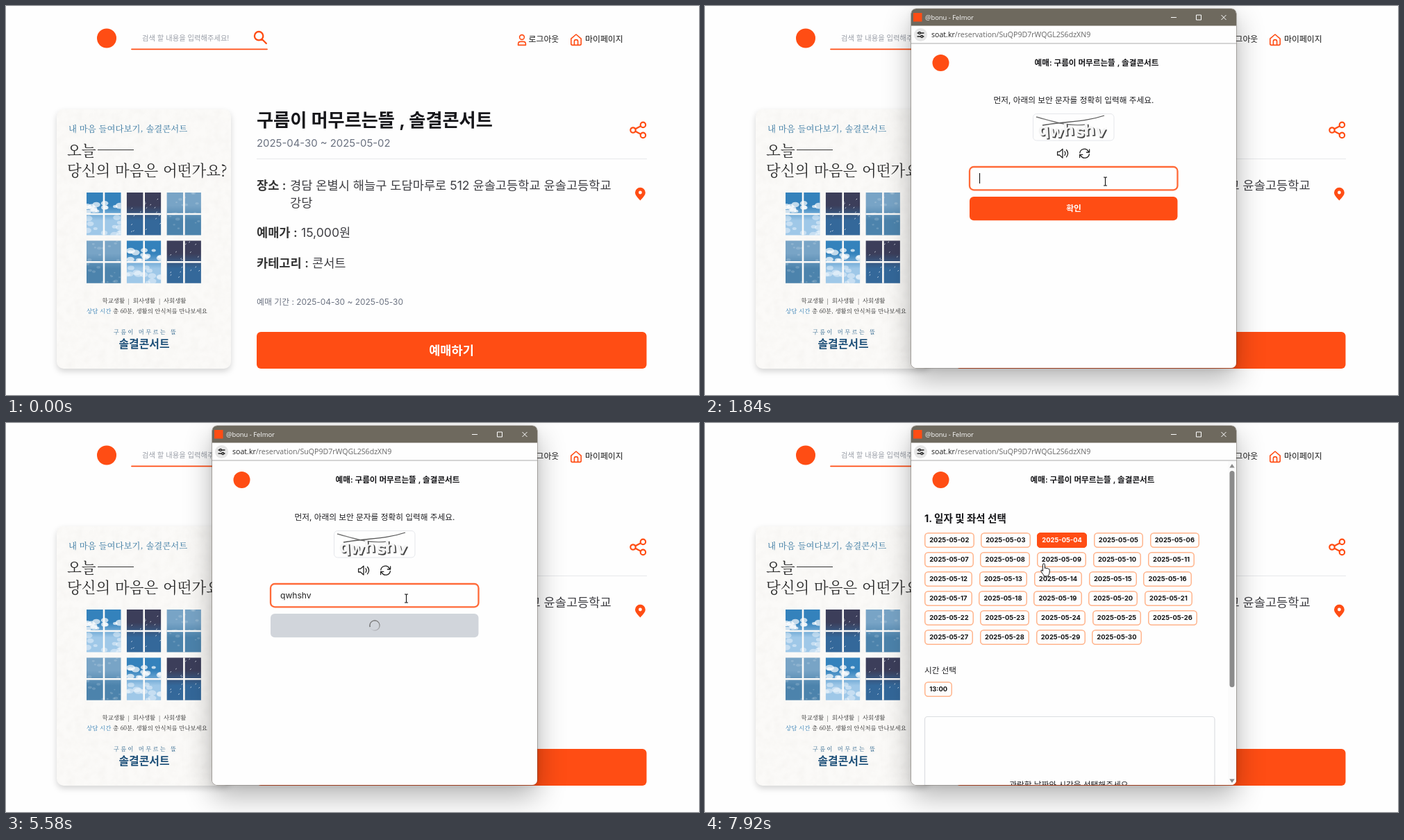
An HTML page that plays this animation: 998x561 px, repeating every 7990 ms.

```html
<!DOCTYPE html>
<html lang="ko">
<head>
<meta charset="utf-8">
<title>예매</title>
<style>
  html, body { margin: 0; width: 100%; height: 100%; overflow: hidden; background: #fefefe; }
  #stage { position: relative; width: 998px; height: 561px; overflow: hidden; --main: #ff4d14;
    font-family: Inter, "Noto Sans CJK KR", "Noto Sans CJK", sans-serif; }
  svg { position: absolute; left: 0; top: 0; display: block; }
  svg svg { overflow: hidden; }
  .mid { text-anchor: middle; }
  .b { font-weight: 700; }
  .sb { font-weight: 600; }
  .info { font-size: 17.6px; fill: #3f3f44; }
  .info .sb { fill: #333; }
  .body { font-size: 11.7px; fill: #1d1d20; }
  .line { fill: none; stroke: var(--main); stroke-linecap: round; stroke-linejoin: round; }
  .dark { fill: none; stroke: #222; stroke-width: 1.3; stroke-linecap: round; stroke-linejoin: round; }
  .ui { font-family: "Open Sans", "Noto Sans", sans-serif; }
  #serif { font-family: "Noto Serif CJK KR", "Noto Sans CJK KR Light", "Noto Sans CJK KR", serif; font-weight: 300; fill: #2a2a2a; }
  #poster { filter: drop-shadow(0 4px 4px rgba(0, 0, 0, .16)); }
  #popup { position: absolute; left: 297px; top: 4px; width: 468px; height: 518px; border-radius: 7px;
    box-shadow: 0 0 0 .6px rgba(80, 70, 60, .6), 0 16px 40px rgba(0, 0, 0, .3), 0 2px 10px rgba(0, 0, 0, .08); }
  #clip { position: absolute; inset: 0; border-radius: 7px; overflow: hidden; background: #fefefe; }
  .spin { position: absolute; border-radius: 50%; background: conic-gradient(from 190deg, #757575, #8d8d8d 30%, #d9d9d9 72%, #f4f4f4); }
  #bigSpin { left: 217px; top: 154px; width: 33px; height: 33px;
    -webkit-mask: radial-gradient(circle, transparent 12.4px, #000 13px); mask: radial-gradient(circle, transparent 12.4px, #000 13px); }
  #smallSpin { left: 226px; top: 280px; width: 16px; height: 16px;
    background: conic-gradient(from 190deg, #757575, #858585 45%, #c4c7cd 85%, #d1d5db);
    -webkit-mask: radial-gradient(circle, transparent 6.1px, #000 6.7px); mask: radial-gradient(circle, transparent 6.1px, #000 6.7px); }
  #dates { position: absolute; left: 19px; top: 154.2px; width: 418px; display: flex; flex-wrap: wrap; gap: 6.5px 9.5px; }
  .chip { height: 21.5px; padding: 0 7.2px; border-radius: 5.5px; box-shadow: inset 0 0 0 1.5px var(--edge, #ffb48c);
    font-size: 9.4px; font-weight: 700; line-height: 21.5px; color: #111; background: #fefefe; white-space: nowrap; }
  #time { position: absolute; left: 19px; top: 369.4px; }
</style>
</head>
<body>
<div id="stage">
  <svg width="998" height="561">
    <defs>
      <filter id="paper" x="0" y="0" width="1" height="1">
        <feTurbulence type="fractalNoise" baseFrequency=".09" numOctaves="3" seed="4"/>
        <feColorMatrix values="0 0 0 0 .6  0 0 0 0 .58  0 0 0 0 .54  .16 0 0 0 -.05"/>
        <feComposite in2="SourceGraphic" operator="in"/>
      </filter>
    </defs>

    <circle cx="145" cy="46.5" r="14" fill="#ff4d14"/>
    <text x="196" y="49.8" font-size="10.3" fill="#9a9fa8">검색 할 내용을 입력해주세요!</text>
    <path class="line" stroke-width="1.8" stroke-linecap="butt" d="M181 62.3H376"/>
    <path class="line" stroke-width="2.3" d="M370.3 43.2a6.2 6.2 0 1 0 -12.4 0a6.2 6.2 0 1 0 12.4 0M368.8 48L374.8 54"/>
    <g class="line" stroke-width="1.6">
      <circle cx="743" cy="45" r="3.4"/>
      <path d="M737.6 56.4V55q0-3.6 3.6-3.6h3.6q3.6 0 3.6 3.6v1.4Z"/>
      <path d="M813.8 47.2L821 41L828.2 47.2V54.6q0 1.8-1.8 1.8H815.6q-1.8 0-1.8-1.8ZM818.4 56V51q0-2.4 2.6-2.4t2.6 2.4v5"/>
    </g>
    <g font-size="11.9" fill="#151515">
      <text x="752.5" y="52.4">로그아웃</text>
      <text x="834" y="52.4">마이페이지</text>
    </g>

    <g id="poster">
      <rect x="73" y="149" width="251" height="374" rx="10" fill="#fbfaf8"/>
      <rect x="73" y="149" width="251" height="374" rx="10" filter="url(#paper)"/>
    </g>
    <g id="serif">
      <text x="90" y="181.7" font-size="12.4" fill="#34759f">내 마음 들여다보기, 솔결콘서트</text>
      <text x="88" y="215.8" font-size="21.6">오늘</text>
      <path d="M132 207.5H184" stroke="#333"/>
      <text x="88" y="244.8" font-size="21.5">당신의 마음은 어떤가요?</text>
      <text x="199" y="428.4" font-size="8.4" class="mid" word-spacing="2">학교생활 | 회사생활 | 사회생활</text>
      <text x="116" y="443.2" font-size="8.5" fill="#2a78b0">상담 시간</text>
      <text x="154" y="443.2" font-size="8.4">총 60분, 생활의 안식처를 만나보세요</text>
      <text x="155" y="473.2" font-size="8.2" font-weight="500" letter-spacing="2.4" fill="#215c87">구름이 머무르는 뜰</text>
    </g>
    <text x="199" y="492.8" font-size="15.9" class="mid b" fill="#1e5079">솔결콘서트</text>
    <g id="panes"></g>

    <text x="361" y="174" font-size="26.2" class="b" fill="#16161a">구름이 머무르는뜰 , 솔결콘서트</text>
    <text x="361" y="202.6" font-size="14.9" fill="#6b7280">2025-04-30 ~ 2025-05-02</text>
    <path d="M361 220.5H923" stroke="#e7e8eb"/>
    <g class="line" stroke-width="2.2">
      <path d="M906.4 177.3L914 173.2M906.4 180.7L914 184.8"/>
      <circle cx="917.4" cy="171.4" r="3.7"/><circle cx="903" cy="179" r="3.7"/><circle cx="917.4" cy="186.4" r="3.7"/>
    </g>
    <path d="M913.4 280.5C909 275.6 906 272.6 906 269a7.4 7.2 0 0 1 14.8 0C920.8 272.6 917.8 275.6 913.4 280.5Z" fill="#ff4d14"/>
    <circle cx="913.4" cy="269" r="2.4" fill="#fff"/>
    <g class="info">
      <text x="361" y="264.5" class="sb">장소 :</text>
      <text x="409" y="264.5">경담 온별시 해늘구 도담마루로 512 윤솔고등학교 윤솔고등학교</text>
      <text x="409" y="289.5">강당</text>
      <text x="361" y="333.4" class="sb">예매가 :</text>
      <text x="425" y="333.4">15,000원</text>
      <text x="361" y="376.6" class="sb">카테고리 :</text>
      <text x="441" y="376.6">콘서트</text>
    </g>
    <text x="361" y="430.6" font-size="11.9" fill="#6b7280">예매 기간 : 2025-04-30 ~ 2025-05-30</text>
    <rect x="361" y="470" width="561.5" height="53" rx="6" fill="#ff4d14"/>
    <text x="641.5" y="502.6" font-size="17.6" class="mid b" fill="#fff">예매하기</text>
  </svg>

  <div id="popup"><div id="clip">
    <svg width="468" height="518" viewBox="297 4 468 518">
      <rect x="297" y="4" width="468" height="24.5" fill="#6e695e"/>
      <rect x="300" y="10" width="12.5" height="12.5" fill="#ff4d14"/>
      <text x="317" y="20" font-size="9.4" class="ui" fill="#fff">@bonu - Felmor</text>
      <path d="M671 16.5H679M707.5 13H714.5V20H707.5ZM743.5 13L750.5 20M750.5 13L743.5 20" fill="none" stroke="#fff"/>
      <path d="M297 54H765" stroke="#c6c6c6" stroke-width="1.6"/>
      <circle cx="310.5" cy="41.5" r="9.5" fill="#e6e6e6"/>
      <path class="dark" d="M306 39H307M311 39H315M306 44H310M314 44H315"/>
      <circle class="dark" cx="309" cy="39" r="1.5"/><circle class="dark" cx="312.2" cy="44" r="1.5"/>
      <text x="326" y="45.3" font-size="10.6" class="ui" fill="#666"><tspan fill="#1f1f1f">soat.kr</tspan>/reservation/SuQP9D7rWQGL2S6dzXN9</text>

      <g id="content">
        <circle cx="339.5" cy="82" r="12" fill="#ff4d14"/>
        <text id="head" y="85.6" font-size="11.6" class="mid sb" fill="#151518">예매: 구름이 머무르는뜰 , 솔결콘서트</text>

        <g id="check">
          <text x="531" y="139.8" class="body mid">먼저, 아래의 보안 문자를 정확히 입력해 주세요.</text>
          <rect x="472.5" y="155.5" width="116.5" height="38.5" rx="5" fill="none" stroke="#e5e7eb"/>
          <g id="captcha">
            <path d="M477 160C500 166 520 174 549 171" fill="none" stroke="#777" stroke-width="1.3"/>
            <path d="M486 172C520 166 545 168 575 158" fill="none" stroke="#555" stroke-width="1.3"/>
          </g>
          <path class="dark" d="M507.6 210.2H510.5L515 206.2V219L510.5 215H507.6ZM518 209.8q2 2.8 0 5.6M520.6 207.5q4 5.1 0 10.2"/>
          <path class="dark" d="M539.8 211.8A6.6 6.6 0 0 1 552 209.5L553.6 211M553.6 206.8V211H549.4M553.4 213.6A6.6 6.6 0 0 1 541.2 215.9L539.6 214.4M539.6 218.6V214.4H543.8"/>
          <rect id="field" x="381" y="232" width="299.5" height="33.3" rx="6" fill="#fefefe"/>
          <text id="typed" x="395" y="252.6" font-size="12.1" fill="#222"></text>
          <rect id="caret" y="241" width="1.1" height="15" fill="#111"/>
          <rect id="submit" x="381" y="275" width="299.5" height="34.3" rx="6"/>
          <text id="ok" x="531" y="296.4" font-size="11.8" class="mid b" fill="#fff">확인</text>
        </g>

        <g id="pick">
          <text x="316" y="143.3" font-size="14.5" class="b" fill="#151518">1. 일자 및 좌석 선택</text>
          <text id="timeLabel" x="316" y="361.2" class="body" font-weight="500">시간 선택</text>
          <g id="panel">
            <rect x="316.5" y="349" width="417.5" height="240" rx="4" fill="none" stroke="#dcdee2" stroke-width="1.2"/>
            <text x="525.5" y="451.7" class="body mid">관람할 날짜와 시간을 선택해주세요.</text>
          </g>
          <rect x="753" y="55" width="12" height="467" fill="#fbfbfb"/>
          <rect id="thumb" x="755.5" y="69" width="7" rx="3.5" fill="#8b8b8b"/>
          <path d="M755.3 64.5L759 59L762.7 64.5ZM755.3 513.5L759 519L762.7 513.5Z" fill="#8b8b8b"/>
        </g>
      </g>
    </svg>
    <div id="bigSpin" class="spin"></div>
    <div id="smallSpin" class="spin"></div>
    <div id="dates"></div>
    <div id="time" class="chip">13:00</div>
  </div></div>

  <svg width="998" height="561">
    <g id="cursor">
      <path id="arrow" d="M0 0V13.6L3.1 10.7L5.2 15.3L7.2 14.4L5.2 9.9H9.6Z" fill="#fff" stroke="#111"/>
      <circle id="busy" cx="11" cy="1" r="4.5" fill="none" stroke="#1e88dd" stroke-width="2.6"/>
      <path id="beam" d="M-2.5 -6H-.6L0 -5.4L.6 -6H2.5M0 -5.4V5.4M-2.5 6H-.6L0 5.4L.6 6H2.5" fill="none" stroke="#111" stroke-width="1.1"/>
      <path id="hand" d="M-1.6 10.5V1.4a1.5 1.5 0 0 1 3 0V6.5q1.4-1 2.5.3q1.5-.8 2.4.5q1.9-.4 1.9 1.6V12q0 2.5-1.6 4.6V18H0V16.5q-2-1.7-4-5.6q-.6-2 1-1.8Z" fill="#fff" stroke="#111"/>
    </g>
  </svg>
</div>

<script>
const LOOP = 7990, CAPTCHA = 1370, FOCUS = 1700, SENT = 5230, PICK = 6530, TIME = 7480;
const $ = id => document.getElementById(id);
const ramp = (t, a, b) => Math.min(1, Math.max(0, (t - a) / (b - a)));
const ease = p => p * p * (3 - 2 * p);
const mix = (a, b, p) => `color-mix(in srgb, ${b} ${p * 100}%, ${a})`;
const show = (id, on) => { $(id).style.visibility = on ? 'visible' : 'hidden'; };
const use = (id, on) => { $(id).style.display = on ? '' : 'none'; };

let seed = 11;
const rand = (a, b) => a + (b - a) * ((seed = seed * 16807 % 2147483647) / 2147483647);
const many = (n, make) => Array.from({ length: n }, (_, i) => make(i)).join('');

// Poster windows: each a small sky behind a cross of paper-coloured bars
const puff = (x, y, r, o) => `<ellipse cx="${x}" cy="${y}" rx="${r * 1.5}" ry="${r}" fill="#fff" opacity="${o}"/>`;
const star = () => `<path d="M${rand(2, 48)} ${rand(2, 58)}l1.5 -1.2" stroke="#e8eef6" stroke-width=".9"/>`;
const skies = {
  day: ['#3482bc', '#9fc8e8', () =>
    many(13, () => puff(rand(0, 50), rand(14, 30), rand(2, 4.5), .7)) +
    many(13, () => puff(rand(0, 50), rand(36, 62), rand(2, 4.5), .4))],
  night: ['#3c3e5a', '#34689a', () => many(18, star)],
  mist: ['#78a4c6', '#4c83ac', () => many(22, () => puff(rand(0, 50), rand(0, 60), rand(.5, 2.2), .16))]
};
const pane = (kind, i) => {
  const [top, low, detail] = skies[kind];
  return `<svg x="${116 + i % 3 * 57.7}" y="${269 + Math.floor(i / 3) * 69.3}" width="49.5" height="61.5">
    <linearGradient id="sky${i}" x2="0" y2="1"><stop offset=".3" stop-color="${top}"/><stop offset=".65" stop-color="${low}"/></linearGradient>
    <rect width="50" height="62" fill="url(#sky${i})"/>
    ${detail()}<path d="M25 0V62M0 31H50" stroke="#fbfaf8" stroke-width="2.6"/></svg>`;
};
$('panes').innerHTML = ['day', 'night', 'mist', 'mist', 'day', 'night'].map(pane).join('');

// Slanted security letters with a hard shadow
$('captcha').innerHTML += [...'qwhshv'].map((c, i) => {
  const x = [480, 495, 516, 533, 546, 562][i], y = 187 + i % 2;
  const letter = (d, fill) => `<text x="${x + d}" y="${y + d}" font-size="23" font-weight="700" fill="${fill}"
    font-family="DejaVu Sans, sans-serif" transform="rotate(${i % 2 ? 5 : -4} ${x} ${y})">${c}</text>`;
  return letter(1.6, '#444') + letter(0, '#f4f4f4');
}).join('');

$('dates').innerHTML = many(29, i => `<div class="chip">2025-05-${String(i + 2).padStart(2, '0')}</div>`);
const chosen = $('dates').children[2];

const keys = [[FOCUS, ''], [2700, 'q'], [2900, 'qw'], [3570, 'qwh'], [3770, 'qwhs'], [4900, 'qwhsh'], [5040, 'qwhshv']];
const track = [[430, 620, 13], [850, 576.5, 253], [6100, 576.5, 253], [6940, 562, 236], [7150, 504, 157],
  [7260, 504, 157], [7420, 500, 167], [7710, 496, 170], [7910, 488, 203]];

function cursorAt(t) {
  const i = track.findIndex(k => k[0] > t);
  if (i < 1) return track.at(i).slice(1);
  const [a, b] = [track[i - 1], track[i]], p = ease(ramp(t, a[0], b[0]));
  return [a[1] + (b[1] - a[1]) * p, a[2] + (b[2] - a[2]) * p];
}

function drawPopup(t) {
  const open = 1 - (1 - ramp(t, 120, 290)) ** 3, picking = t >= PICK, loaded = t >= 330, timed = t >= TIME;
  show('popup', t >= 130);
  $('popup').style.opacity = open;
  $('popup').style.transform = open < 1 ? `scale(${.92 + .08 * open})` : 'none';
  use('content', loaded);
  use('check', !picking);
  use('pick', picking);
  use('dates', picking);
  use('captcha', t >= CAPTCHA);
  use('ok', t < SENT);
  use('timeLabel', timed);
  use('time', timed);
  use('bigSpin', loaded && t < CAPTCHA);
  use('smallSpin', t >= SENT && !picking);
  $('bigSpin').style.transform = $('smallSpin').style.transform = `rotate(${(t - 410) * .36}deg)`;
  $('head').setAttribute('x', picking ? 558 : 564);
  $('panel').setAttribute('transform', `translate(0 ${timed ? 74.5 : 0})`);
  $('thumb').setAttribute('height', timed ? 312 : 352);
}

function drawForm(t) {
  const focus = ramp(t, FOCUS - 30, 1830);
  $('field').style.stroke = mix('#d9dbe0', '#ff6a38', focus);
  $('field').style.strokeWidth = 1.3 + focus;
  $('submit').style.fill = mix('#ff4d14', '#d1d5db', ramp(t, SENT - 40, SENT + 140));
  const [since, text] = keys.findLast(k => k[0] <= t) || [Infinity, ''];
  $('typed').textContent = text;
  $('caret').setAttribute('x', [395, 402.3, 412, 419, 425, 432, 438][text.length]);
  $('caret').style.opacity = t >= since && (t - since) % 1130 < 530 ? 1 : 0;
}

function drawChoice(t) {
  const hover = ramp(t, 7080, 7210), set = ramp(t, 7770, 7910);
  chosen.style.background = mix(mix('#fefefe', '#ffcdb3', hover), '#ff4d14', set);
  chosen.style.setProperty('--edge', mix('#ffb48c', '#ff4d14', set));
  chosen.style.color = mix('#111', '#fff', set);
}

function drawCursor(t) {
  const beam = t >= 820 && t < 6100, hand = t >= 7400;
  const arrow = t >= 340 && t < 820 || t >= 6940 && !hand;
  show('beam', beam);
  show('hand', hand);
  show('arrow', arrow);
  show('busy', arrow && (t < 540 || t > 7150));
  $('cursor').setAttribute('transform', `translate(${cursorAt(t)})`);
}

function frame(now) {
  const t = now % LOOP;
  drawPopup(t);
  drawForm(t);
  drawChoice(t);
  drawCursor(t);
  requestAnimationFrame(frame);
}
requestAnimationFrame(frame);
</script>
</body>
</html>
```
